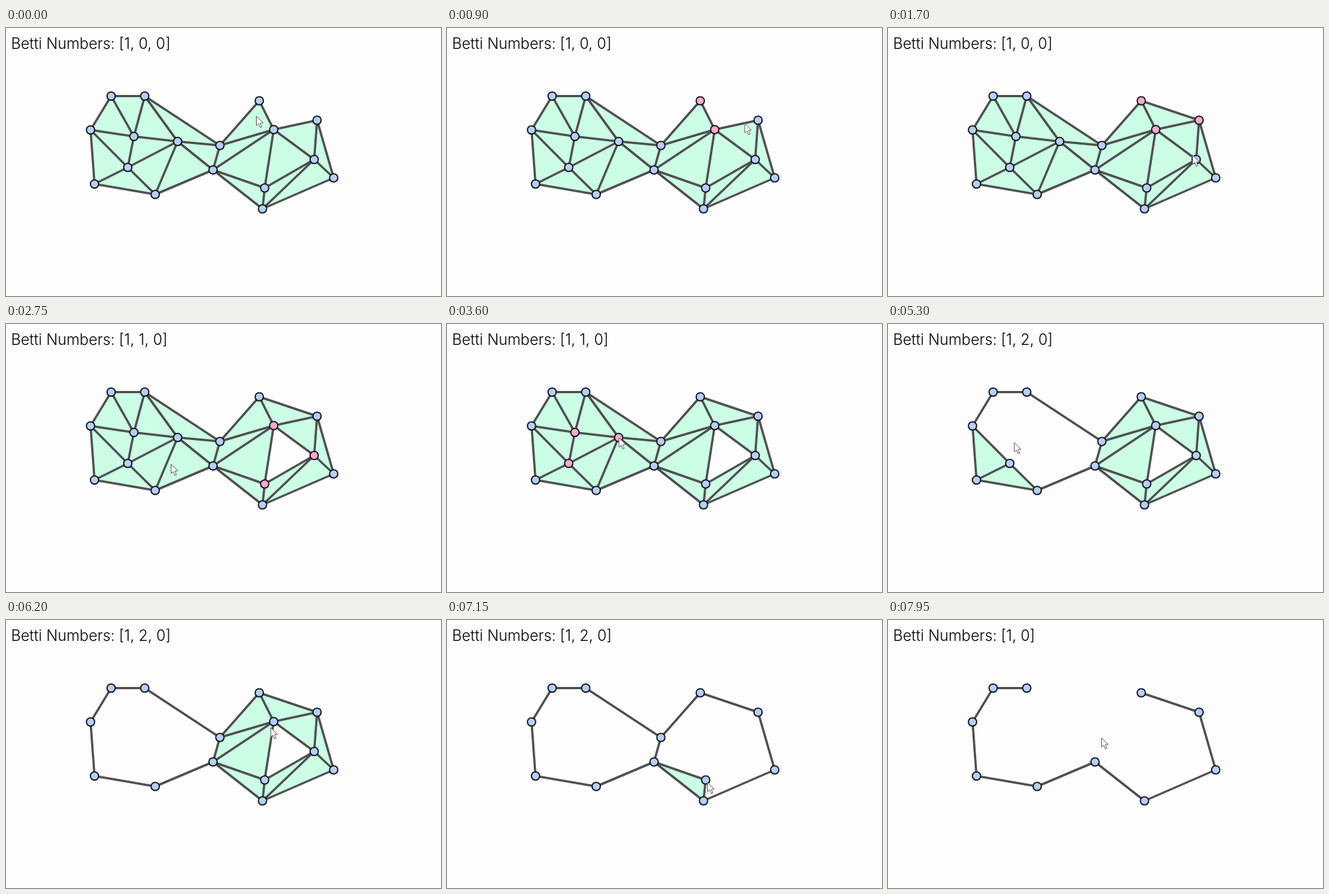
Write an HTML page with a canvas that moves like this. It is 602x372 px and loops after 8000 ms.

```html
<!DOCTYPE html>
<html lang="en">
<head>
<meta charset="utf-8">
<title>Betti numbers</title>
<style>
  html, body { margin: 0; width: 100%; height: 100%; overflow: hidden; background: #fefdfe; }
  canvas { display: block; }
</style>
</head>
<body>
<canvas id="stage" width="602" height="372"></canvas>
<script>
const ctx = document.getElementById('stage').getContext('2d');
const LOOP = 8000, STEP = 50;

const nodes = {
  A: [145.5, 94.5], B: [192, 94.5], C: [117, 141.5], D: [177, 150.5], E: [237.5, 157.5],
  F: [168.5, 193.5], G: [122.5, 216.5], H: [206.5, 231], I: [296, 163], J: [286.5, 197],
  K: [350.5, 101], L: [370.5, 141], M: [430.5, 128], N: [426.5, 182.5], O: [453.5, 208],
  P: [358, 222], Q: [355, 251]
};
const triangles = ('ABD ACD BDE BEI CDF CFG DEF EFH FGH EHJ EIJ IJL IKL KLM JLP JPQ ' +
  'LMN LNP MNO NPQ NOQ').split(' ');

// pick: select a node; toggle: add or remove the selected triangle;
// erase: delete a node; move: only the cursor travels
const script = [
  [0, 'move', [346, 122]],
  [250, 'pick', 'K'], [650, 'pick', 'L'], [1050, 'pick', 'M'], [1300, 'toggle'],
  [1700, 'move', [421, 176]],
  [1800, 'pick', 'N'], [2150, 'pick', 'P'], [2500, 'pick', 'L'], [2600, 'toggle'],
  [2750, 'move', [228, 194]],
  [3050, 'pick', 'F'], [3450, 'pick', 'D'], [3600, 'pick', 'E'], [3850, 'toggle'],
  [4450, 'move', [256, 167]],
  [4750, 'erase', 'E'], [5150, 'erase', 'D'], [5550, 'erase', 'F'],
  [6200, 'move', [366, 149]],
  [6350, 'erase', 'L'], [6800, 'erase', 'N'],
  [7150, 'move', [360, 225]],
  [7200, 'erase', 'P'],
  [7700, 'move', [295, 163]],
  [7850, 'erase', 'I']
];

const sides = ([a, b, c]) => [a + b, a + c, b + c];
const corners = simplex => [...simplex].map(v => nodes[v]);

// Cursor stops: explicit moves, and every clicked node before the final rest
const stops = script
  .filter(([t, , to]) => to && t <= 7700)
  .map(([t, , to]) => ({ t, at: nodes[to] || to }));

function stateAt(t) {
  const verts = new Set(Object.keys(nodes));
  const faces = new Set(triangles);
  const edges = new Set(triangles.flatMap(sides));
  faces.delete('KLM');
  edges.delete('KM');
  let picked = [];

  for (const [time, action, v] of script) {
    if (time > t) break;
    if (action === 'pick') picked = picked.length === 3 ? [v] : [...picked, v];
    if (action === 'toggle') {
      const face = [...picked].sort().join('');
      if (!faces.delete(face)) {
        faces.add(face);
        sides(face).forEach(e => edges.add(e));
      }
    }
    if (action === 'erase') {
      picked = [];
      for (const set of [verts, edges, faces])
        for (const s of set) if (s.includes(v)) set.delete(s);
    }
  }
  return { verts, edges, faces, picked };
}

// The complex stays connected and has no voids, so b1 follows from Euler's formula
function bettiLabel({ verts, edges, faces }) {
  const betti = [1, 1 - (verts.size - edges.size + faces.size)];
  if (faces.size) betti.push(0);
  return `Betti Numbers: [${betti.join(', ')}]`;
}

function cursorAt(t) {
  const i = stops.findIndex(s => s.t > t);
  if (i < 0) return stops[stops.length - 1].at;
  const p = stops[i - 1], q = stops[i];
  const u = (t - p.t) / (q.t - p.t), s = u * u * (3 - 2 * u);
  return p.at.map((c, k) => c + (q.at[k] - c) * s);
}

function trace(points, close) {
  ctx.beginPath();
  points.forEach(p => ctx.lineTo(...p));
  if (close) ctx.closePath();
}

function stroke(color, width) {
  ctx.strokeStyle = color;
  ctx.lineWidth = width;
  ctx.stroke();
}

function drawCursor(x, y) {
  ctx.save();
  ctx.translate(x + 0.5, y + 0.5);
  trace([[0, 0], [0, 13], [3, 10.3], [5.2, 15.5], [7.4, 14.6], [5.2, 9.5], [9.3, 9.3]], true);
  ctx.fillStyle = '#fff';
  ctx.fill();
  stroke('#66666c', 1);
  ctx.restore();
}

function draw(t) {
  const state = stateAt(t);
  ctx.fillStyle = '#fefdfe';
  ctx.fillRect(0, 0, 602, 372);

  ctx.fillStyle = '#ccfee6';
  for (const f of state.faces) {
    trace(corners(f), true);
    ctx.fill();
  }
  for (const e of state.edges) {
    trace(corners(e));
    stroke('#404040', 3);
    stroke('#606060', 1);
  }
  for (const v of state.verts) {
    ctx.beginPath();
    ctx.arc(...nodes[v], 5.7, 0, Math.PI * 2);
    ctx.fillStyle = state.picked.includes(v) ? '#fba9cd' : '#b5cff8';
    ctx.fill();
    stroke('#10131a', 1.7);
  }

  ctx.font = '300 20.8px Inter, sans-serif';
  ctx.fillStyle = '#000';
  ctx.fillText(bettiLabel(state), 7, 29);
  drawCursor(...cursorAt(t));
}

function tick() {
  const t = performance.now() % LOOP;
  draw(Math.floor(t / STEP) * STEP);
  requestAnimationFrame(tick);
}
tick();
</script>
</body>
</html>
```
